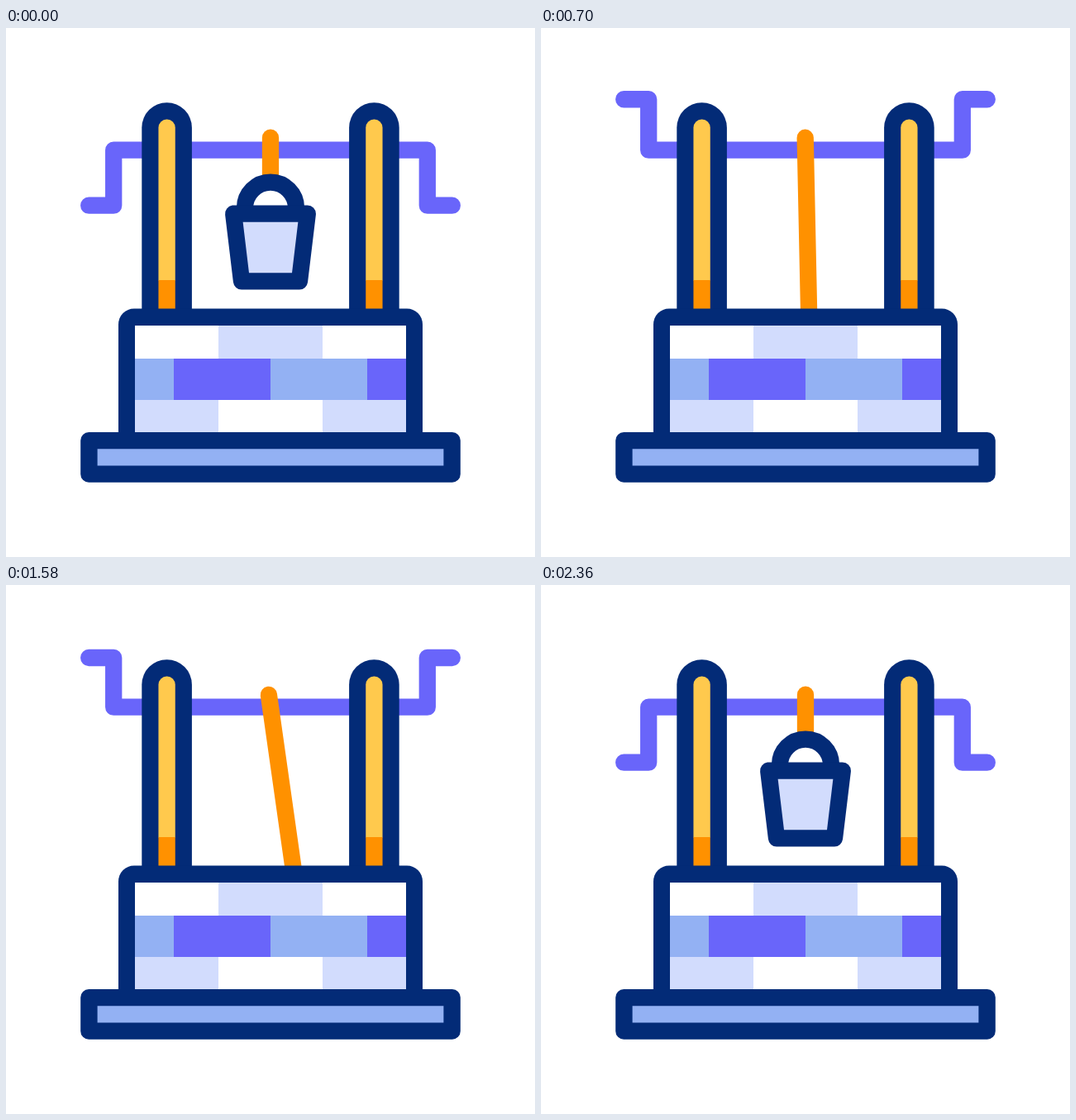
An HTML page with a canvas for the animation above (2.4 s loop, 640x640 px).

```html
<!DOCTYPE html>
<html lang="en">
<head>
<meta charset="utf-8">
<title>Well</title>
<style>
html, body { margin: 0; width: 100%; height: 100%; overflow: hidden; background: #fff; }
canvas { display: block; width: 100vmin; height: 100vmin; }
</style>
</head>
<body>
<canvas id="stage" width="640" height="640"></canvas>
<script>
const ctx = document.getElementById('stage').getContext('2d');
const LOOP = 2400, MID = 320, AXLE = 147.7, LINE = 20.3;
const NAVY = '#032b77', PURPLE = '#6965fa', BLUE = '#93b1f3', PALE = '#d2dcfd',
      YELLOW = '#ffc94d', ORANGE = '#ff9100', TEAL = '#66ccd0', WHITE = '#fff';

const mix = (a, b, p) => a + (b - a) * p;
const span = (t, from, to) => Math.min(1, Math.max(0, (t - from) / (to - from)));
const ease = p => (1 - Math.cos(Math.PI * p)) / 2;
const pulse = (t, from, to) => Math.sin(Math.PI * span(t, from, to)) ** 2;

// The crank makes two turns to lower the bucket and two to raise it.
function handleY(t) {
  const turns = 2 * span(t, 41, 961) + 2 * span(t, 1374, 2348);
  return AXLE + 67 * Math.cos(2 * Math.PI * turns);
}

const dropAt = t => 185 * (ease(span(t, 160, 812)) - ease(span(t, 1582, 2229)));

// Degrees: a wide swing on the way down, a counter swing on the way up, small rebounds.
const swingAt = t => 11.5 * pulse(t, 0, 600) - 1.2 * pulse(t, 450, 950)
                   - 8.1 * pulse(t, 1167, 2033) + 0.5 * pulse(t, 1900, 2200);

function box(color, x, y, w, h, radii = 0) {
  ctx.fillStyle = color;
  ctx.beginPath();
  ctx.roundRect(x, y, w, h, radii);
  ctx.fill();
}

// A box centred on the given x
const centredBox = (color, x, y, w, h, radii) => box(color, x - w / 2, y, w, h, radii);

function paint(points, line, fill) {
  ctx.beginPath();
  points.forEach(([x, y]) => ctx.lineTo(x, y));
  if (fill) {
    ctx.closePath();
    ctx.fillStyle = fill;
    ctx.fill();
  }
  ctx.strokeStyle = line;
  ctx.stroke();
}

function drawCrank(y) {
  for (const side of [-1, 1]) {
    const elbow = MID + side * 189.8;
    paint([[elbow + side * 30, y], [elbow, y], [elbow, AXLE], [MID, AXLE]], PURPLE);
  }
}

function drawBucket(drop, degrees) {
  ctx.save();
  ctx.translate(MID, AXLE);
  ctx.rotate(degrees * Math.PI / 180);
  ctx.translate(0, -AXLE);
  paint([[0, 132.7], [0, 187 + drop]], ORANGE);
  ctx.translate(0, drop);
  ctx.beginPath();
  ctx.arc(0, 217.7, 31, Math.PI, 0);
  ctx.fillStyle = WHITE;
  ctx.fill();
  ctx.strokeStyle = NAVY;
  ctx.stroke();
  paint([[-44.8, 224.7], [44.8, 224.7], [35, 306.4], [-35, 306.4]], NAVY, PALE);
  ctx.restore();
}

function drawPost(x) {
  centredBox(NAVY, x, 90.2, 60.6, 260, [30.3, 30.3, 0, 0]);
  centredBox(YELLOW, x, 110.5, LINE, 195, [10, 10, 0, 0]);
  centredBox(ORANGE, x, 305, LINE, 40);
}

// A stroke that grows along a curve, then shrinks away at its far end
function drawSplash(t, start, bend, end) {
  const head = span(t, 1880, 2102), tail = span(t, 1985, 2155);
  if (head <= tail) return;
  const pointAt = p => start.map((s, i) =>
    mix(mix(s, bend[i], p), mix(bend[i], end[i], p), p));
  paint(Array.from({ length: 17 }, (_, i) => pointAt(mix(tail, head, i / 16))), TEAL);
}

function drawBricks(y, height, width, colors) {
  const left = MID - width * colors.length / 2;
  colors.forEach((color, i) => box(color, left + i * width, y, width, height));
}

function drawWell() {
  centredBox(NAVY, MID, 339.5, 368, 160, [19, 19, 0, 0]);
  ctx.save();
  ctx.beginPath();
  ctx.rect(156, 360, 328, 129);
  ctx.clip();
  drawBricks(360, 40, 126, [WHITE, PALE, WHITE]);
  drawBricks(400, 50, 117, [BLUE, PURPLE, BLUE, PURPLE]);
  drawBricks(450, 40, 126, [PALE, WHITE, PALE]);
  ctx.restore();
  centredBox(NAVY, MID, 489, 459.6, 60.8, 10);
  centredBox(BLUE, MID, 509.3, 418.8, 20.1);
}

function draw(t) {
  box(WHITE, 0, 0, 640, 640);
  ctx.lineWidth = LINE;
  ctx.lineCap = ctx.lineJoin = 'round';
  drawCrank(handleY(t));
  drawBucket(dropAt(t), swingAt(t));
  drawPost(MID - 125.4);
  drawPost(MID + 125.4);
  drawSplash(t, [275, 340], [228, 262], [160, 268]);
  drawSplash(t, [371, 340], [403, 270], [460, 265]);
  drawWell();
}

const begin = performance.now();
function tick() {
  draw((performance.now() - begin) % LOOP);
  requestAnimationFrame(tick);
}
tick();
</script>
</body>
</html>
```
